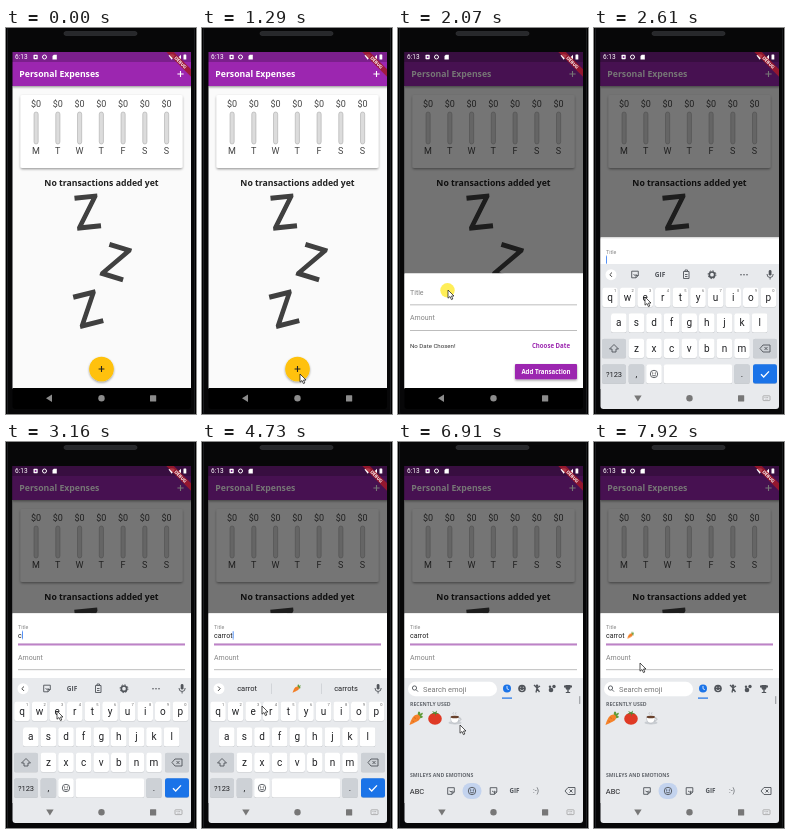
Animation of 190x386 px, one loop 8 s. Source, as an HTML page:

```html
<!DOCTYPE html>
<html lang="en">
<head>
<meta charset="utf-8">
<title>Expense entry</title>
<style>
html, body { margin: 0; width: 100%; height: 100%; overflow: hidden; background: #000; }
svg { display: block; width: 190px; height: 386px; }
text { font-family: Roboto, sans-serif; white-space: pre; }
.b { font-family: "Open Sans", sans-serif; font-weight: 700; }
.m { text-anchor: middle; }
.line { fill: none; stroke: #50545a; stroke-width: .9; }
</style>
</head>
<body>
<script>
const LOOP = 8000;
const rules = [];

// Keyframe helpers: each returns an animation declaration.
function anim(frames, ease = 'linear') {
  const name = 'k' + rules.length;
  const body = frames.map(([t, css]) => `${t / LOOP * 100}%{${css}}`).join('');
  rules.push(`@keyframes ${name}{${body}}`);
  return `animation:${name} ${LOOP}ms ${ease} infinite`;
}
function show(...spans) {
  const frames = [[0, 'opacity:0']];
  for (const [a, b] of spans) frames.push([a, 'opacity:1'], [b, 'opacity:0']);
  return anim(frames, 'step-end');
}
function move(frames, ease = 'ease-in-out') {
  const last = frames[frames.length - 1];
  return anim([...frames, [LOOP, last[1], last[2]]]
    .map(([t, x, y]) => [t, `transform:translate(${x}px,${y}px)`]), ease);
}

// Drawing helpers
const text = (x, y, s, size, fill, cls = '') =>
  `<text x="${x}" y="${y}" font-size="${size}" fill="${fill}" class="${cls}">${s}</text>`;
const rect = (x, y, w, h, fill, r = 0, more = '') =>
  `<rect x="${x}" y="${y}" width="${w}" height="${h}" rx="${r}" fill="${fill}" ${more}/>`;
const disc = (x, y, r, fill, more = '') =>
  `<circle cx="${x}" cy="${y}" r="${r}" fill="${fill}" ${more}/>`;
const path = (d, fill, more = '') => `<path d="${d}" fill="${fill}" ${more}/>`;
const line = d => `<path d="${d}" class="line"/>`;
const group = (style, ...parts) => `<g style="${style}">${parts.join('')}</g>`;
const use = (id, x, y, s = 1) => `<use href="#${id}" transform="translate(${x} ${y}) scale(${s})"/>`;
const plus = (x, y, r, color) =>
  path(`M${x - r} ${y}h${2 * r}M${x} ${y - r}v${2 * r}`, 'none', `stroke="${color}" stroke-width="1.1"`);

const PURPLE = '#9c27b0', INK = '#202124', PAD = '#e8eaed', GREY = '#50545a';

const defs = `<defs>
  <clipPath id="screen"><path d="M6.5 24H185V378a3 3 0 0 1-3 3H9.500a3 3 0 0 1-3-3Z"/></clipPath>
  <filter id="soft" x="-20%" y="-20%" width="140%" height="150%">
    <feDropShadow dx="0" dy="1.2" stdDeviation="1.2" flood-opacity=".4"/></filter>
  <path id="zed" d="M-11.500-17.500H11.500V-14L-5.500 12.500H12V17.500H-12V14L5-12.500H-11.500Z" fill="#404040"/>
  <g id="carrot">
    <path d="M2-2.500C1-7 4-8 4.500-4C7-7 8-4 5-2.500C8-2 7 1 3 0Z" fill="#5f9b3a"/>
    <path d="M-6.500 7C-5 1-2-4 2-3.500C5.500-2 4.500 2 1 3.500C-2 5-4 6.200-6.500 7Z" fill="#f5822a"/>
    <path d="M-2-.5l2 1M-3.500 3l1.500.8M1.500 1l1 .8" stroke="#c85f14" stroke-width=".6"/>
  </g>
  <g id="tomato">
    <ellipse cy=".8" rx="6.800" ry="6" fill="#df3a25"/>
    <path d="M0-4.500L-4-3.500L-1.500-5.200L-3-7L0-5.800L2-7.500L1.500-5.200L4.500-4L1-4.200L0-1.500Z" fill="#4b8b34"/>
  </g>
  <g id="coffee">
    <ellipse cy="4.800" rx="6.500" ry="1.700" fill="#c9cdd2"/>
    <path d="M-4.500-1H4C4 3 2.500 5-.3 5S-4.500 3-4.500-1Z" fill="#fff" stroke="#a9adb2" stroke-width=".5"/>
    <path d="M4 0C7-.5 6.500 3 3.200 3" fill="none" stroke="#a9adb2" stroke-width=".8"/>
    <ellipse cx="-.2" cy="-1" rx="4.200" ry="1.300" fill="#68412c"/>
    <path d="M-1.500-3.500q-1-1 0-2.200M1-3.500q-1-1 0-2.200" fill="none" stroke="#a9adb2" stroke-width=".6"/>
  </g>
  <g id="smile">
    <circle r="3.700" class="line"/><circle cx="-1.300" cy="-1" r=".6"/><circle cx="1.300" cy="-1" r=".6"/>
    <path d="M-2 .8Q0 3.200 2 .8" class="line"/>
  </g>
  <g id="erase"><path d="M-5 0L-2-3.500H5V3.500H-2ZM-.5-1.500l3 3m0-3l-3 3" class="line"/></g>
  <g id="note"><path d="M-3.300-3.300H3.300V1L1 3.300H-3.300ZM1 3.300V1H3.300M-1.500 0q1.500 1.800 3 0" class="line"/></g>
</defs>`;

function home() {
  const bars = [...'MTWTFSS'].map((day, i) => {
    const x = 30 + i * 21.75;
    return text(x, 79.3, '$0', 9, '#444', 'm')
      + rect(x - 2, 84, 4.2, 32, '#dcdcdc', 2.1, 'stroke="#9e9e9e" stroke-width=".5"')
      + text(x, 126.200, day, 9, '#444', 'm');
  }).join('');
  const zed = (x, y, a) => `<use href="#zed" transform="translate(${x} ${y}) rotate(${a})"/>`;
  return rect(6, 58, 180, 303, '#fafafa')
    + rect(6, 34, 180, 24, PURPLE, 0, 'filter="url(#soft)"')
    + rect(6, 23, 180, 11, '#7b1f8c')
    + text(13.3, 49.200, 'Personal Expenses', 8.7, '#fff', 'b')
    + plus(174.5, 46, 3.1, '#fff')
    + rect(14.500, 67, 162, 73, '#fff', 1.700, 'filter="url(#soft)"') + bars
    + text(95.5, 157.500, 'No transactions added yet', 8.7, '#212121', 'b m')
    + zed(81.500, 184, -6) + zed(110, 234, 17) + zed(82, 281, -14)
    + disc(95.500, 341, 12.3, '#ffc107', 'filter="url(#soft)"') + plus(95.500, 341, 2.900, '#222');
}

function typed() {
  const states = [['c', 3160], ['ca', 3310], ['car', 3480], ['carr', 3860], ['carro', 4030], ['carrot', 4270]];
  const words = states.map(([s, t], i) =>
    group(show([t, i < 5 ? states[i + 1][1] : LOOP]), text(12, 270, s, 7, '#222')));
  const caret = (x, ...spans) => group(show(...spans), rect(x, 263.500, .9, 8, '#4285f4'));
  return words.join('')
    + group(show([7220, LOOP]), use('carrot', 36.500, 267.600, .5))
    + caret(12, [2300, 2800]) + caret(16, [3160, 3310]) + caret(19.700, [3310, 3480])
    + caret(22, [3480, 3860]) + caret(24.400, [3860, 4030]) + caret(28.400, [4030, 4270])
    + caret(30.700, [4270, 4770], [5280, 5660])
    + caret(32.700, [5660, 5740], [6120, 6640]) + caret(41, [7220, 7600]);
}

function sheet() {
  const label = anim([
    [0, 'transform:translate(12px,266.5px)'], [2150, 'transform:translate(12px,266.5px)'],
    [2350, 'transform:translate(12px,261.5px) scale(.75)'], [LOOP, 'transform:translate(12px,261.5px) scale(.75)']
  ], 'ease-out');
  return group(move([[0, 0, 120], [1370, 0, 120], [1530, 0, 0], [2500, 0, 0], [2840, 0, -74.5]], 'ease-out'),
    rect(6, 245.300, 180, 200, '#fff', 1),
    group(label, text(0, 0, 'Title', 7, '#858585')),
    rect(12, 276.600, 167, .6, '#929292'),
    group(show([2150, LOOP]), rect(12, 276.500, 167, 1, PURPLE)),
    typed(),
    text(12, 292.200, 'Amount', 7, '#858585'),
    rect(12, 302, 167, .6, '#929292'),
    text(12, 320, 'No Date Chosen!', 6.1, '#333'),
    text(153, 320, 'Choose Date', 6.1, PURPLE, 'b m'),
    rect(117, 336, 62, 15.300, PURPLE, 1, 'filter="url(#soft)"'),
    text(148, 345.800, 'Add Transaction', 6.1, '#fff', 'b m'));
}

function strip() {
  const tools = use('note', 41, 246.500)
    + text(66, 249, 'GIF', 6.500, GREY, 'b m')
    + line('M89.500 243.500h5.500v7h-5.500zM91 243v-1h2.500v1M91 246.500h2.500M91 248.500h2.500')
    + disc(118, 246.700, 2.700, 'none', `stroke="${GREY}" stroke-width="1.700"`)
    + disc(118, 246.700, 3.900, 'none', `stroke="${GREY}" stroke-width="1" stroke-dasharray="1.500 1.560"`)
    + [147, 150, 153].map(x => disc(x, 246.700, .8, GREY)).join('');
  const ideas = [
    [3310, 3630, 'ca', 'can', 'call'], [3630, 3860, 'car', 'care', 'card'],
    [3860, 4100, 'carr', 'carry', 'carrot'], [4100, 4330, 'carro', 'carrot', 'carrots'],
    [4330, 6120, 'carrot', '', 'carrots'], [6120, LOOP, 'and', 'cake', 'is']
  ].map(([a, b, ...words]) => group(show([a, b]),
    words.map((w, i) => w ? text(45 + i * 49.500, 249.200, w, 7.500, INK, 'm') : use('carrot', 94.500, 246.500, .6)).join('')));
  const arrow = d => path(d, 'none', 'stroke="#444" stroke-width="1"');
  return disc(17, 246.700, 5.500, '#fff')
    + group(show([0, 3310]), arrow('M18 244.500l-2.200 2.200l2.200 2.200'), tools)
    + group(show([3310, LOOP]), arrow('M16 244.500l2.200 2.200l-2.200 2.200'),
      rect(69, 241.500, .6, 10.500, '#c4c7cb'), rect(119, 241.500, .6, 10.500, '#c4c7cb'))
    + ideas.join('')
    + rect(174.700, 242, 2.800, 5.600, GREY, 1.400) + line('M173 246q0 3.500 3.100 3.500t3.100-3.500M176.100 249.500v2');
}

function keyboard() {
  const key = (x, y, w, fill = '#fff') =>
    rect(x - w / 2, y - 9.500, w, 19.600, '#c5c8cc', 2.200) + rect(x - w / 2, y - 9.700, w, 19.200, fill, 2.200);
  const row = (letters, x0, y) => [...letters].map((c, i) =>
    key(x0 + i * 17.6, y, 15.600) + text(x0 + i * 17.6, y + 3.200, c, 10, INK, 'm')).join('');
  const digits = [...'1234567890'].map((d, i) => text(21 + i * 17.6, 264.200, d, 4, '#666', 'm')).join('');
  const DARK = '#cdd1d6';
  return rect(6, 236, 180, 126, PAD) + strip()
    + row('qwertyuiop', 16, 269.500) + digits
    + row('asdfghjkl', 24.800, 295) + row('zxcvbnm', 42.400, 320.500)
    + key(20, 320.500, 24, DARK) + line('M20 316.500l4.500 4.500h-2.500v3h-4v-3h-2.500z')
    + key(171, 320.500, 24, DARK) + use('erase', 171, 320.500)
    + key(20, 346, 24, DARK) + text(20, 348.800, '?123', 7.5, INK, 'm')
    + key(42.400, 346, 15.600, DARK) + text(42.400, 348.500, ',', 9, INK, 'm')
    + key(60, 346, 15.600) + use('smile', 60, 346)
    + key(104, 346, 68.500)
    + key(148, 346, 15.600, DARK) + text(148, 348.500, '.', 9, INK, 'm')
    + key(171, 346, 24, '#1a73e8')
    + path('M167 346.200l2.700 2.800l5.300-5.600', 'none', 'stroke="#fff" stroke-width="1.300"');
}

function emojiPanel() {
  return rect(6, 236, 180, 126, PAD)
    + rect(10, 239.800, 89, 14.400, '#fff', 7.200)
    + disc(16.500, 246, 2.100, 'none', 'class="line"') + line('M18 247.600l2 2')
    + text(25, 249.500, 'Search emoji', 7.5, '#777')
    + disc(109, 246.500, 4, '#1a73e8') + path('M109 244v2.700l1.800 1', 'none', 'stroke="#fff" stroke-width=".8"')
    + rect(104, 255.500, 10, 1.200, '#1a73e8')
    + disc(124, 246.500, 3.800, GREY) + path('M122 247.500q2 2.500 4 0M122.200 245.300h1M124.800 245.300h1', 'none', `stroke="${PAD}" stroke-width=".8"`)
    + disc(139, 243.700, 1.300, GREY) + path('M136 243l3 3l3-2M139 246l-1 4.500M139 246.500l2.500 3.500', 'none', `stroke="${GREY}" stroke-width="1.300"`)
    + disc(153, 248, 2.300, GREY) + disc(156, 244.500, 1.700, GREY) + disc(152, 244.800, 1.200, GREY)
    + path('M167.500 243h5v3q0 2-2.500 2t-2.500-2zM169.300 248h1.400v2h1.500v1h-4.400v-1h1.500zM166 243.500h8v2h-8z', GREY)
    + text(12, 264, 'RECENTLY USED', 5.2, '#63676d', 'b')
    + use('carrot', 18, 276) + use('tomato', 37, 276) + use('coffee', 57, 276)
    + rect(181, 254, 1.300, 8, '#a5a8ac', .6)
    + text(12, 335, 'SMILEYS AND EMOTIONS', 5.2, '#63676d', 'b')
    + text(19, 352, 'ABC', 7.500, INK, 'm')
    + use('note', 53, 349)
    + rect(64.500, 341, 19, 16, '#c3d3ee', 8) + use('smile', 74, 349)
    + use('note', 95.500, 349)
    + text(116.500, 351.400, 'GIF', 6.2, GREY, 'b m') + text(138, 351.400, ':-)', 7, GREY, 'm')
    + use('erase', 172, 349);
}

function nav() {
  const common = c => disc(95.500, 370.300, 3.200, c) + rect(144, 367.200, 6.200, 6.200, c, .5);
  const dark = rect(6, 360, 180, 22, '#000') + path('M40 370.300l6-3.700v7.400z', '#8c8c8c') + common('#8c8c8c');
  const light = rect(6, 360, 180, 22, PAD) + path('M40.200 367.500h7.400l-3.700 6z', '#777') + common('#777')
    + rect(169, 367.800, 7, 4.800, 'none', .6, 'stroke="#999" stroke-width=".7"')
    + path('M170.500 369.500h4M171.500 371.200h2', 'none', 'stroke="#999" stroke-width=".7" stroke-dasharray=".8 .5"');
  return dark + group(show([2250, LOOP]), light);
}

function status() {
  const W = '#fff';
  return text(9, 31.300, '6:13', 6.500, W)
    + rect(27.500, 26.800, 4.200, 4.400, W, .6) + disc(29.600, 29, 1, '#7b1f8c')
    + disc(38.500, 29, 2, 'none', 'stroke="#fff" stroke-width="1"')
    + path('M46.500 28l1.300-1.300h3v4.800h-4.300z', W)
    + path('M162.500 27.500q3.200-2.400 6.400 0l-3.200 4.200z', W)
    + path('M170 31.700h5v-5z', W) + rect(177.500, 26.600, 2.800, 5, W, .4)
    + `<g transform="translate(174.500 34.500) rotate(45)">${rect(-20, -2.700, 40, 5.300, '#a3192a', 0, 'opacity=".85"')}${text(0, 1.600, 'DEBUG', 4.400, W, 'b m')}</g>`;
}

function pointer() {
  const path0 = [[0, 106, 394], [830, 106, 388], [1200, 98, 346], [1770, 98, 346], [2000, 50, 262],
    [2300, 50, 262], [2530, 51, 269], [4660, 51, 269], [4730, 60, 264], [4800, 66, 268], [5110, 100, 318],
    [5230, 100, 318], [5400, 94, 347], [5620, 94, 347], [5740, 66, 350], [5970, 63, 348], [6560, 63, 348],
    [6910, 62, 283], [6980, 62, 283], [7160, 20, 277], [7480, 20, 277], [7920, 46, 221]];
  return group(move(path0),
    group(show([1370, 1490], [2000, 2150], [5430, 5660], [6420, 6560], [7160, 7290]),
      disc(-.5, .3, 7.200, '#ffeb3b', 'opacity=".85"')),
    path('M0 0V8.200L2 6.500L3.400 9.600L4.800 9L3.500 6H6Z', '#fff', 'stroke="#111" stroke-width=".7"'));
}

const scrim = anim([[0, 'opacity:0'], [1370, 'opacity:0'], [1530, 'opacity:.54'], [LOOP, 'opacity:.54']]);
const rise = move([[0, 0, 126], [2230, 0, 126], [2530, 0, 0]], 'ease-out');

const scene = `<svg viewBox="0 0 190 386">${defs}
  ${rect(0, 0, 190, 386, '#000')}
  ${rect(1.500, -12, 187, 410, '#070708', 14, 'stroke="#1c1d20" stroke-width="1"')}
  ${rect(58, 3.500, 73, 4, '#27282b', 2, 'stroke="#3a3b3f" stroke-width=".5"')}
  <g clip-path="url(#screen)">
    ${home()}
    ${group(scrim, rect(6, 23, 180, 338, '#000'))}
    ${sheet()}
    ${group(rise, keyboard())}
    ${group(show([6560, LOOP]), emojiPanel())}
    ${nav()}
    ${status()}
  </g>
  ${pointer()}
</svg>`;

document.head.insertAdjacentHTML('beforeend', `<style>${rules.join('')}</style>`);
document.body.insertAdjacentHTML('beforeend', scene);
</script>
</body>
</html>
```
